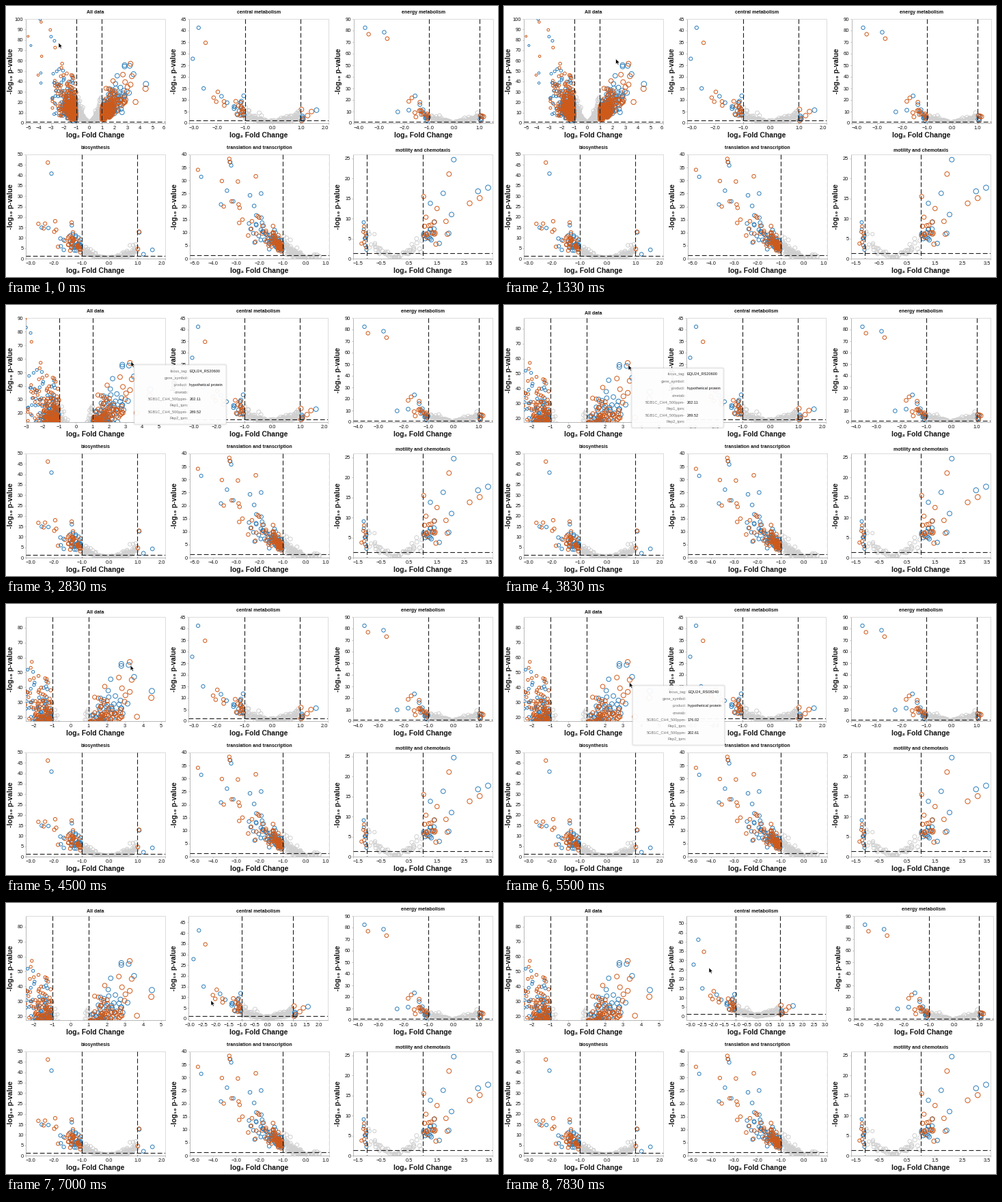
A matplotlib script for the animation above (8 s loop, 720 by 398 pixels).

```python
import numpy as np
import matplotlib.pyplot as plt
from matplotlib.animation import FuncAnimation
from matplotlib.patches import FancyBboxPatch, Polygon

W, H = 720, 398
BOX_W, BOX_H = 204, 153
FRAMES, LOOP = 80, 8000
PT = 0.72  # points per pixel at 100 dpi
BLUE, ORANGE, GRAY = "#2f7fbb", "#cf5a1a", "#d0d0d0"
INK = "#111111"

plt.rcParams["font.family"] = ["Liberation Sans", "DejaVu Sans"]
fig = plt.figure(figsize=(W / 100, H / 100), dpi=100, facecolor="white")


def fmt(v, digits):
    return f"{v + 0.0:.{digits}f}".replace("-", "−")


def tail(rng, n, side, spread, base, slope, sigma, far):
    """Significant points: p-value grows with the distance from |x| = 1."""
    e = rng.exponential(spread, n) % far
    q = (base + slope * e) * np.exp(sigma * rng.normal(size=n))
    return np.column_stack([side * (1.02 + e), q])


def valley(rng, n, lo, hi, height, power=1.5, sigma=0.4):
    """Points that are not significant, in a V around zero."""
    x = rng.uniform(lo, hi, n)
    q = height * np.abs(x) ** power * np.exp(sigma * rng.normal(size=n))
    return np.column_stack([x, q + np.abs(rng.normal(0, 0.012 * height + 0.3, n))])


class Panel:
    """One volcano plot; marks are its outliers, blue and orange in turn."""

    def __init__(self, title, left, top, xlim, ylim, ystep, marks, tails, valleys,
                 xstart=0.0, digits=1, size=(2.9, 0.1), seed=1):
        self.left, self.top = left, top
        self.xlim, self.ylim = np.array(xlim, float), np.array(ylim, float)
        self.ystep, self.xstart, self.digits = ystep, xstart, digits
        self.k = None
        self.ax = fig.add_axes([0, 0, 1, 1], facecolor="none")
        self.place(0)
        self.style(title)

        rng = np.random.default_rng(seed)
        cloud = np.vstack([marks] + [tail(rng, *args) for args in tails])
        noise = np.vstack([valley(rng, *args) for args in valleys])
        layers = [(GRAY, noise), (BLUE, cloud[::2]), (ORANGE, cloud[1::2])]
        for z, (color, pts) in enumerate(layers):
            r = np.clip(size[0] + size[1] * pts[:, 0], 1.0, 4.2)
            self.ax.scatter(*pts.T, s=(2 * r * PT) ** 2, facecolors="none",
                            edgecolors=color, linewidths=1.0 * PT, zorder=3 + z)
        self.zoom(1)

    def style(self, title):
        ax = self.ax
        for side, spine in ax.spines.items():
            axis = side in ("left", "bottom")
            spine.set(color="#b8b8b8" if axis else "#dcdcdc", linewidth=1.0 * PT)
        ax.tick_params(length=2 * PT, width=0.8 * PT, color="#bbbbbb",
                       labelsize=7.5 * PT, labelcolor=INK, pad=1.6 * PT)
        dash = dict(color="#1c1c1c", lw=1.1 * PT, ls=(0, (6.2, 3)), zorder=8)
        for x in (-1, 1):
            ax.plot([x, x], [1, 0], transform=ax.get_xaxis_transform(), **dash)
        ax.axhline(1.3, **dash)
        put = dict(transform=ax.transAxes, ha="center", weight="bold", color=INK)
        self.title = ax.text(0.5, 1, title, va="center", size=7 * PT, **put)
        ax.text(0.5, -21 / BOX_H, "log₂ Fold Change", va="baseline",
                size=10.2 * PT, **put)
        ax.text(-21.6 / BOX_W, 0.5, "-log₁₀ p-value", va="center", rotation=90,
                size=10.2 * PT, **put)

    def place(self, shift):
        self.ax.set_position([(self.left + shift) / W, 1 - (self.top + BOX_H) / H,
                              BOX_W / W, BOX_H / H])

    def zoom(self, k, anchor=(0, 0)):
        if k == self.k:
            return
        self.k = k
        xl = anchor[0] + (self.xlim - anchor[0]) / k
        yl = anchor[1] + (self.ylim - anchor[1]) / k
        xs = self.ticks(xl, 1 if k >= 1 else 0.5, self.xstart)
        ys = self.ticks(yl, self.ystep)
        ax = self.ax
        ax.set_xticks(xs, [fmt(v, self.digits) for v in xs])
        ax.set_yticks(ys, [fmt(v, 0) for v in ys])
        ax.set_xlim(*xl)
        ax.set_ylim(*yl)
        # labels at the very edge stay inside the box
        near = np.ptp(xl) * 0.003
        for v, label in zip(xs, ax.get_xticklabels()):
            label.set_ha("left" if v - xl[0] < near else
                         "right" if xl[1] - v < near else "center")
        # a label at the top edge pushes the title up
        crowded = yl[1] - ys[-1] < 0.01 * np.ptp(yl)
        self.title.set_y(1 + (9.7 if crowded else 6) / BOX_H)

    @staticmethod
    def ticks(lim, step, start=0.0):
        a = np.ceil((lim[0] - start) / step - 1e-6)
        b = np.floor((lim[1] - start) / step + 1e-6)
        return start + step * np.arange(a, b + 1)


everything = Panel(
    "All data", 29, 19, (-5, 6), (0, 100), 10, digits=0, size=(2.7, 0.27), seed=4,
    marks=[(-4.6, 74.5), (-4.82, 83.3), (-3.87, 99.5), (-3.79, 97), (-3.01, 83),
           (-3.07, 89.5), (-2.74, 79), (-2.69, 72.5), (3.2, 55), (3.26, 57),
           (3.5, 47), (3.37, 45), (4.48, 37.5), (4.45, 33)],
    tails=[(560, -1, 0.5, 10, 8.5, 0.5, 1.9), (24, -1, 1.6, 16, 15, 0.35, 3.6),
           (370, 1, 0.6, 8, 9.5, 0.42, 2.7)],
    valleys=[(420, -1, 1, 12)])

central = Panel(
    "central metabolism", 268, 19, (-3, 2), (0, 45), 5, size=(3.1, 0.2), seed=2,
    marks=[(-2.66, 41.2), (-2.41, 34.7), (-2.87, 27.8), (-1.97, 13.5), (-2.48, 15),
           (-2.12, 11), (-1.84, 11.6), (-1.74, 7.6), (-1.04, 11.8), (1.03, 5.9),
           (1.57, 5.6), (1.39, 5)],
    tails=[(24, -1, 0.2, 4.5, 6, 0.3, 0.45), (4, -1, 9, 8.8, 0, 0.05, 1.1),
           (6, 1, 0.15, 2.2, 5, 0.3, 0.4)],
    valleys=[(150, -1, 1, 2.9, 1.2)])

energy = Panel(
    "energy metabolism", 509, 19, (-4, 1.55), (0, 90), 10, size=(3, 0.1), seed=3,
    marks=[(-3.55, 82.4), (-3.41, 76.8), (-2.79, 78.5), (-2.67, 73), (-2.25, 9.7),
           (-1.69, 21.8), (-1.56, 23.5), (-1.81, 18.8), (-1.81, 11.2), (-1.37, 18)],
    tails=[(24, -1, 0.25, 5, 9, 0.35, 0.65), (8, 1, 0.1, 5, 3, 0.3, 0.22)],
    valleys=[(120, -1, 1, 5, 1.3)])

biosynthesis = Panel(
    "biosynthesis", 29, 218, (-3, 2), (0, 50), 5, size=(2.7, 0.05), seed=7,
    marks=[(-2.08, 40.8), (-2.21, 46.1), (-2.43, 14.9), (-2.55, 16.7), (-2.19, 14.7),
           (-2.31, 16.8), (-1.35, 16), (-1.98, 12.9), (1.54, 4.2), (1.02, 4.6),
           (1.07, 12.6), (1.06, 12.9), (1.22, 2.1), (-2.36, 14.5)],
    tails=[(70, -1, 0.33, 6.2, 4.5, 0.36, 0.95)],
    valleys=[(190, -1, 1, 3.9, 1.8)])

translation = Panel(
    "translation and transcription", 269, 218, (-5, 1), (0, 40), 5, size=(2.95, 0.1),
    seed=8,
    marks=[(-4.51, 31.4), (-4.65, 34.1), (-3.26, 37), (-3.3, 38.3), (-3.22, 35.8),
           (-3.28, 37.1), (-3.4, 26.1), (-3.62, 29.8), (-3.66, 20.8), (-3.54, 20),
           (-3.13, 22), (-3.2, 22), (-1.93, 25), (-2.16, 31.6), (-2.41, 24.3),
           (-2.93, 29.6)],
    tails=[(136, -1, 0.6, 4.3, 6.5, 0.25, 1.9)],
    valleys=[(90, -1, 0, 4.4, 1.2), (40, -0.6, 0.65, 2.2, 1.2)])

motility = Panel(
    "motility and chemotaxis", 508, 218, (-1.5, 3.5), (0, 26), 5, xstart=0.5,
    size=(2.75, 0.32), seed=9,
    marks=[(2.11, 24.7), (1.94, 21.1), (2.98, 16.8), (3.04, 15.1), (3.34, 17.7),
           (2.68, 13.8), (1.73, 16.3), (1.03, 15.5), (1.27, 13.8), (1.51, 12.5),
           (2.03, 11), (1.83, 9.3), (1.93, 6.3), (1.88, 6.1), (1.59, 3.8), (1.47, 3.6)],
    tails=[(26, 1, 0.3, 6, 5, 0.25, 0.6), (14, -1, 0.2, 4.5, 15, 0.45, 0.24)],
    valleys=[(64, -0.98, 0.98, 4.2)])

stage = fig.add_axes([0, 0, 1, 1], facecolor="none", zorder=10)
stage.set(xlim=(0, W), ylim=(H, 0))
stage.axis("off")


class Tooltip:
    KEYS = ["locus_tag:", "gene_symbol:", "product:", "cmetab:", "5GB1C_CH4_500ppm-",
            "Rep1_tpm:", "5GB1C_CH4_500ppm-", "Rep2_tpm:"]

    def __init__(self):
        self.boxes = []
        for grow, alpha in [(2.4, 0.03), (1.2, 0.05)]:
            self.boxes.append((grow, self.box(grow, fc="black", ec="none", alpha=alpha)))
        self.boxes.append((0, self.box(0, fc=(1, 1, 1, 0.94), ec="#e2e2e2",
                                       lw=0.8 * PT)))
        font = dict(size=5.6 * PT, va="center", zorder=12)
        self.keys = [stage.text(0, 0, k, ha="right", color="#707070", **font)
                     for k in self.KEYS]
        self.values = [stage.text(0, 0, "", color=INK, **font) for _ in self.KEYS]

    @staticmethod
    def box(grow, **kw):
        style = f"round,pad=0,rounding_size={2 + grow}"
        return stage.add_patch(FancyBboxPatch((0, 0), 134 + 2 * grow, 87 + 2 * grow,
                                              boxstyle=style, zorder=11, **kw))

    def show(self, x, y, record):
        for art in [b for _, b in self.boxes] + self.keys + self.values:
            art.set_visible(record is not None)
        if record is None:
            return
        tag, rep1, rep2 = record
        texts = [tag, "", "hypothetical protein", "", rep1, "", rep2, ""]
        for grow, b in self.boxes:
            b.set_x(x - grow)
            b.set_y(y - grow)
        row = y + 9
        for name, key, value, s in zip(self.KEYS, self.keys, self.values, texts):
            key.set_position((x + 78.5, row))
            value.set_position((x + 80.5, row))
            value.set_text(s)
            row += 8.9 if name.endswith("-") else 10.4  # wrapped names sit closer


tooltip = Tooltip()
ARROW = np.array([(0, 0), (0, 7.6), (1.8, 6.1), (3.1, 8.8), (4.3, 8.2), (3.1, 5.6),
                  (5.4, 5.4)])
cursor = stage.add_patch(Polygon(ARROW, fc="black", ec="white", lw=0.5 * PT, zorder=14))

# start, end and goal of each pointer move
HOME = np.array([77, 54])
MOVES = [(0.5, 1.6, (183, 83)), (3.0, 3.5, (182, 88)), (4.4, 5.0, (183.5, 115)),
         (5.8, 6.5, (300, 143)), (7.2, 7.7, (300, 95))]
# start, end, record under the pointer
HOVERS = [(1.6, 4.45, ("EQU24_RS20600", "202.11", "289.52")),
          (4.95, 5.9, ("EQU24_RS08240", "176.02", "202.61"))]


def pointer(t):
    pos = HOME
    for a, b, goal in MOVES:
        u = np.clip((t - a) / (b - a), 0, 1)
        pos = pos + (np.array(goal) - pos) * u * u * (3 - 2 * u)
    return pos


def update(i):
    t = i * LOOP / FRAMES / 1000
    everything.zoom(np.interp(t, [2.4, 2.8, 3.2], [1, 1.306, 1.432]), (3.4, 57.5))
    central.zoom(np.interp(t, [6.6, 7.0, 7.6], [1, 0.925, 0.803]), (-2.25, 8.4))

    # wider tick labels push the neighbouring panels
    central.place(-0.8 if t > 2.6 else 0)
    energy.place(2.7 if t > 7.4 else -1 if t > 2.6 else 0)

    tip = pointer(t)
    cursor.set_xy(ARROW + tip)
    record = next((r for a, b, r in HOVERS if a <= t < b), None)
    tooltip.show(*(tip + 5), record)
    return []


anim = FuncAnimation(fig, update, frames=FRAMES, interval=LOOP // FRAMES,
                     repeat=True, repeat_delay=0, blit=False)
plt.show()
```
